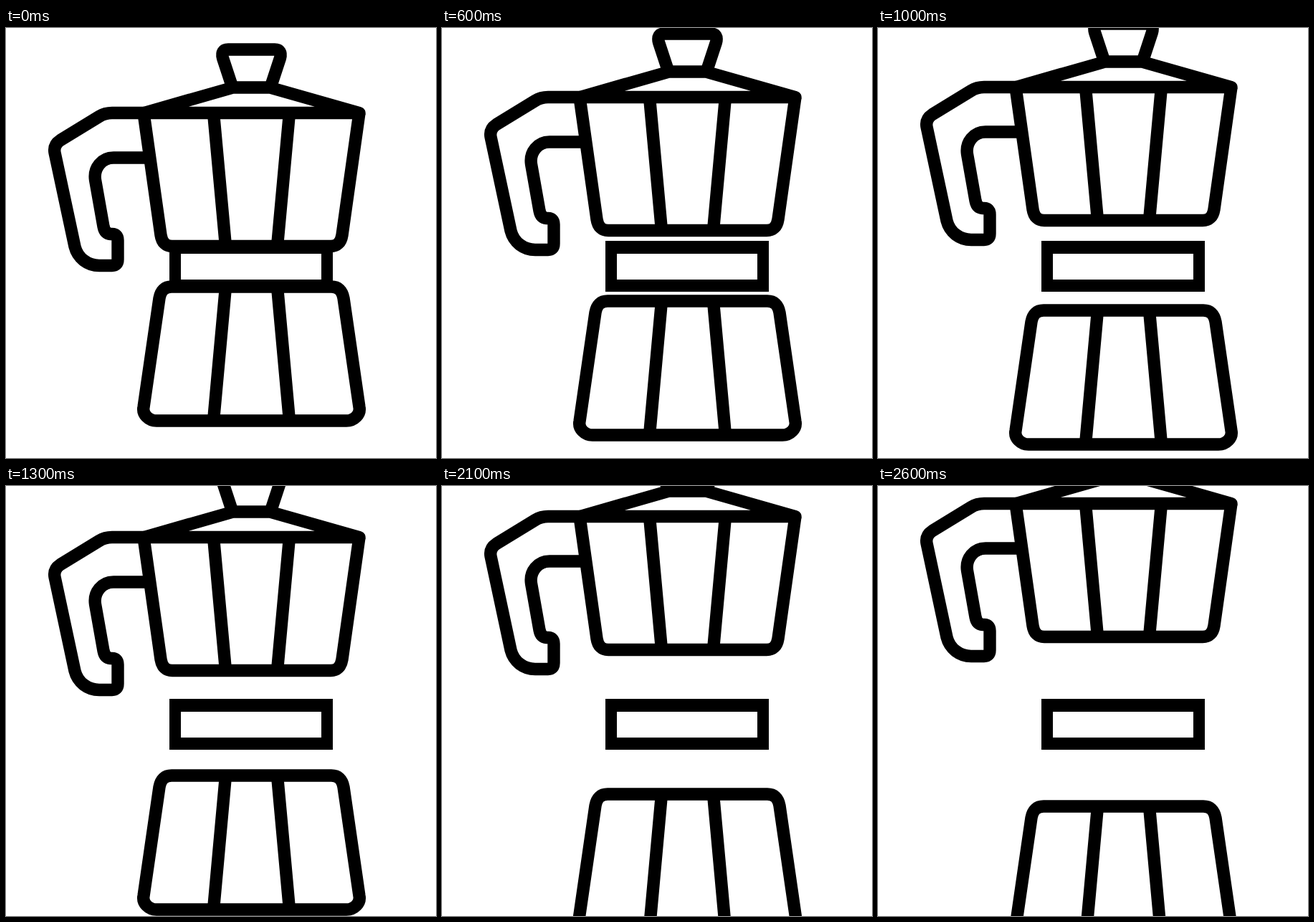
Recreate the animation shown at these times as an HTML page. Size 600 by 600 pixels, loop 3600 ms.

```html
<!DOCTYPE html>
<html lang="en">
<head>
<meta charset="utf-8">
<title>Moka pot coming apart</title>
<style>
  html, body { margin: 0; width: 100%; height: 100%; overflow: hidden; background: #fff; }
  svg { display: block; width: 100%; height: 100%; }
  g { fill: none; stroke: #000; stroke-width: 17.4; stroke-linejoin: round; }
</style>
</head>
<body>
<svg viewBox="0 0 600 600">
  <!-- collar -->
  <path fill-rule="evenodd" d="M228 297H456V368H228ZM244 315V351H440V315Z"/>

  <g id="top">
    <!-- knob, lid -->
    <path d="M316 83L302.500 42Q299.500 30 310 30H375Q385.500 30 382.500 42L369 83"/>
    <path d="M192.500 118.500L317 83H368L493 118.500Z"/>
    <!-- body -->
    <path d="M192 118.500L216 289Q218.500 304.500 232 304.500H453Q466.500 304.500 469 289L493 118.500"/>
    <path d="M289.500 118.500L306.500 304.500M395.500 118.500L378.500 304.500"/>
    <!-- handle -->
    <path d="M193 118.500H148Q138 118.500 130 123.500L76 156.500Q66 163 68 174L96 305C100 321 114 331.500 130 331.500H148Q156 331.500 156 323V296Q156 287.500 148 287.500H146Q138 287 136 277L124.500 212C122 195 134 181 150 181H198"/>
  </g>

  <g id="base">
    <path d="M231 361H454Q468 361 471 377L493 529C495 539 486 548 475 548H210C199 548 190 539 192 529L214 377Q217 361 231 361Z"/>
    <path d="M306.500 361L289.500 548M378.500 361L395.500 548"/>
  </g>
</svg>
<script>
  const LOOP = 3600, STEP = 100, STEPS = 26;
  const RISE = 94, DROP = 86;
  const top_ = document.getElementById("top");
  const base = document.getElementById("base");

  const shift = (part, y) => part.setAttribute("transform", `translate(0 ${Math.round(y)})`);

  function draw(now) {
    // Ten steps per second, then the parts rest until the loop restarts
    const done = Math.min(STEPS, Math.floor(now % LOOP / STEP)) / STEPS;
    shift(top_, -RISE * done);
    shift(base, DROP * done);
    requestAnimationFrame(draw);
  }
  draw(0);
</script>
</body>
</html>
```
